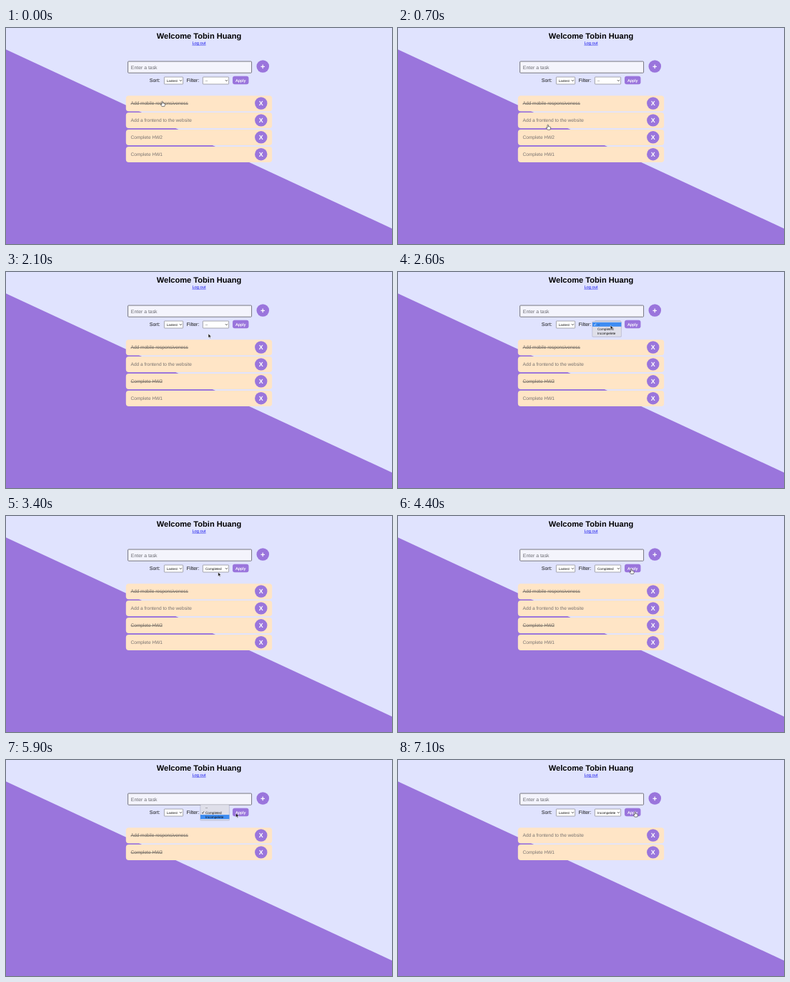
An HTML page that plays this animation: 540 by 304 pixels, repeating every 7200 ms.

```html
<!DOCTYPE html>
<html lang="en">
<head>
<meta charset="utf-8">
<title>Task list</title>
<style>
  html, body { margin: 0; width: 100%; height: 100%; overflow: hidden; background: #e0e3fe; }
  svg { display: block; width: 100vw; height: 100vh; }
  text { font-family: "Liberation Sans", Arial, sans-serif; text-rendering: geometricPrecision; }
  .mid { text-anchor: middle; }
  .bold { font-weight: 700; }
  .purple { fill: #9a75dc; }
  .white { fill: #fff; }
  .label { font-size: 7px; fill: #111; }
  .small { font-size: 4.7px; fill: #111; }
  .task { font-size: 6.57px; fill: #77726f; }
  .done { fill: #6a655f; text-decoration: line-through; }
</style>
</head>
<body>
<svg id="stage" viewBox="0 0 540 304" xmlns="http://www.w3.org/2000/svg">
  <rect width="540" height="304" fill="#e0e3fe"/>
  <path class="purple" d="M0 30.2L540 282.3V304H0Z"/>

  <text class="mid bold" x="270" y="14.6" font-size="11.1">Welcome Tobin Huang</text>
  <text class="mid" x="270" y="22.8" font-size="5.75" fill="#1a1aea" text-decoration="underline">Log out</text>

  <rect x="170.6" y="47" width="173" height="16.2" rx="1" fill="#f4f4fc" stroke="#77777f" stroke-width="1"/>
  <text x="174.8" y="57.6" font-size="6.9" fill="#6c6c72">Enter a task</text>
  <circle class="purple" cx="359.3" cy="54" r="8.8"/>
  <text class="mid bold white" x="359.3" y="57.6" font-size="11">+</text>

  <text class="label" x="200.8" y="75.6">Sort:</text>
  <text class="label" x="252.8" y="75.6">Filter:</text>
  <g fill="#fff" stroke="#85858c" stroke-width=".7">
    <rect x="221.4" y="69" width="26.2" height="10" rx=".6"/>
    <rect x="275.4" y="69" width="36.2" height="10" rx=".6"/>
  </g>
  <path d="M242.9 73.2l1.5 1.6 1.5-1.6M306.9 73.2l1.5 1.6 1.5-1.6" fill="none" stroke="#222" stroke-width=".8"/>
  <text class="small" x="224.7" y="75.7">Lastest</text>
  <text class="small" x="278.9" y="75.7" id="choice"></text>
  <rect class="purple" x="317" y="67.8" width="22.5" height="11.4" rx="3"/>
  <text class="mid white" x="328.2" y="75.5" font-size="5.8" stroke="#fff" stroke-width=".12">Apply</text>

  <g id="cards"></g>
  <g id="menu"></g>
  <g id="cursor">
    <path id="hand" fill="#fff" stroke="#222" stroke-width=".6" stroke-linejoin="round"
      d="M-.7 .5Q0-.5 .7 .5V2.7Q1.5 2.1 2 2.9Q2.8 2.5 3.1 3.2Q3.9 3.1 3.9 4V5.2L3.1 7.1H-.5L-2.4 4.6Q-2.3 3.5-1.3 4.1L-.7 4.6Z"/>
    <path id="arrow" fill="#111" stroke="#fff" stroke-width=".4" stroke-linejoin="round"
      d="M0 0V5.6L1.3 4.4L2.2 6.4L3.1 6L2.2 4.1H4Z"/>
  </g>
</svg>
<script>
const LOOP = 7200;
const NONE = '--', DONE = 'Completed', OPEN = 'Incompelete';
const OPTIONS = [NONE, DONE, OPEN];
const TASKS = [
  { name: 'Add mobile responsiveness', doneAt: 0 },
  { name: 'Add a frontend to the website', doneAt: Infinity },
  { name: 'Complete HW2', doneAt: 1300 },
  { name: 'Complete HW1', doneAt: Infinity }
];

// Cursor stops: time, x, y of the pointing tip
const STOPS = [
  [0, 218.6, 103.2], [200, 218.6, 103.2], [1000, 205.6, 151.2], [1500, 205.6, 151.2],
  [2300, 297.3, 75.2], [2700, 297.3, 75.2], [3000, 295, 79.5], [3300, 295, 79.5],
  [4000, 326.3, 74.4], [4700, 326.3, 74.4], [4900, 317.8, 70.9], [5200, 300, 74],
  [5300, 300, 74], [5500, 298, 79.5], [5700, 298, 79.5], [5900, 321.6, 75],
  [6500, 331.6, 73], [LOOP, 331.6, 73]
];

const el = id => document.getElementById(id);
const show = (id, on) => el(id).setAttribute('display', on ? 'inline' : 'none');
const ease = u => u * u * (3 - 2 * u);

function cursorAt(t) {
  const i = STOPS.findIndex(s => s[0] > t);
  const [t0, x0, y0] = STOPS[i - 1], [t1, x1, y1] = STOPS[i];
  const u = ease((t - t0) / (t1 - t0));
  return [x0 + (x1 - x0) * u, y0 + (y1 - y0) * u];
}

function setMarkup(id, markup) {
  const node = el(id);
  if (node.markup !== markup) node.innerHTML = node.markup = markup;
}

function cardMarkup({ name, done }, i) {
  const y = 95.2 + i * 23.9;
  return `<rect x="167.8" y="${y}" width="204.4" height="22" rx="4" fill="#ffe5c6"/>
    <text class="task ${done ? 'done' : ''}" x="174.5" y="${y + 13.1}">${name}</text>
    <circle class="purple" cx="356.8" cy="${y + 10.8}" r="8.7"/>
    <text class="mid bold white" x="356.8" y="${y + 14.1}" font-size="9">X</text>`;
}

function cardsMarkup(t) {
  const filter = t < 4600 ? NONE : t < 6800 ? DONE : OPEN;
  return TASKS.map(({ name, doneAt }) => ({ name, done: t >= doneAt }))
    .filter(task => filter === NONE || task.done === (filter === DONE))
    .map(cardMarkup).join('');
}

// The menu opens with its checked option over the select box
function menuMarkup(checked, active) {
  const top = 70.8 - checked * 6.3;
  const rows = OPTIONS.map((name, i) => {
    const y = top + i * 6.3, on = i === active;
    const bar = on ? `<rect x="272" y="${y}" width="40.4" height="6" fill="#3d8cf2"/>` : '';
    const tick = i === checked
      ? `<path d="M274.3 ${y + 3.2}l.9 1.3 1.7-3" fill="none" stroke="${on ? '#fff' : '#111'}" stroke-width=".6"/>` : '';
    return `${bar}${tick}<text class="small ${on ? 'white' : ''}" x="278.9" y="${y + 4.7}">${name}</text>`;
  });
  return `<rect x="271.4" y="${top - 1.2}" width="41.6" height="22.2" rx="1.6" fill="#777796" opacity=".25"/>
    <rect x="272" y="${top - 1.4}" width="40.4" height="21.6" rx="1.4" fill="#dfdfe9" stroke="#b4b4c4" stroke-width=".4"/>
    ${rows.join('')}`;
}

function draw(t) {
  const [x, y] = cursorAt(t);
  const first = t >= 2400 && t < 3200, second = t >= 5300 && t < 6000;
  const menu = first ? menuMarkup(0, t < 2850 ? 0 : 1)
    : second ? menuMarkup(1, t < 5400 ? 1 : 2) : '';
  setMarkup('menu', menu);
  setMarkup('cards', cardsMarkup(t));
  el('choice').textContent = t < 3200 ? NONE : t < 6000 ? DONE : OPEN;

  const overApply = x > 317 && x < 339.5 && y > 67.8 && y < 79.2;
  const overTask = x > 168 && x < 372 && y > 95 && y < 189;
  const hand = !menu && (overApply || overTask);
  show('hand', hand);
  show('arrow', !hand);
  el('cursor').setAttribute('transform', `translate(${x} ${y})`);
}

const start = performance.now();
function tick() {
  draw((performance.now() - start) % LOOP);
  requestAnimationFrame(tick);
}
tick();
</script>
</body>
</html>
```
